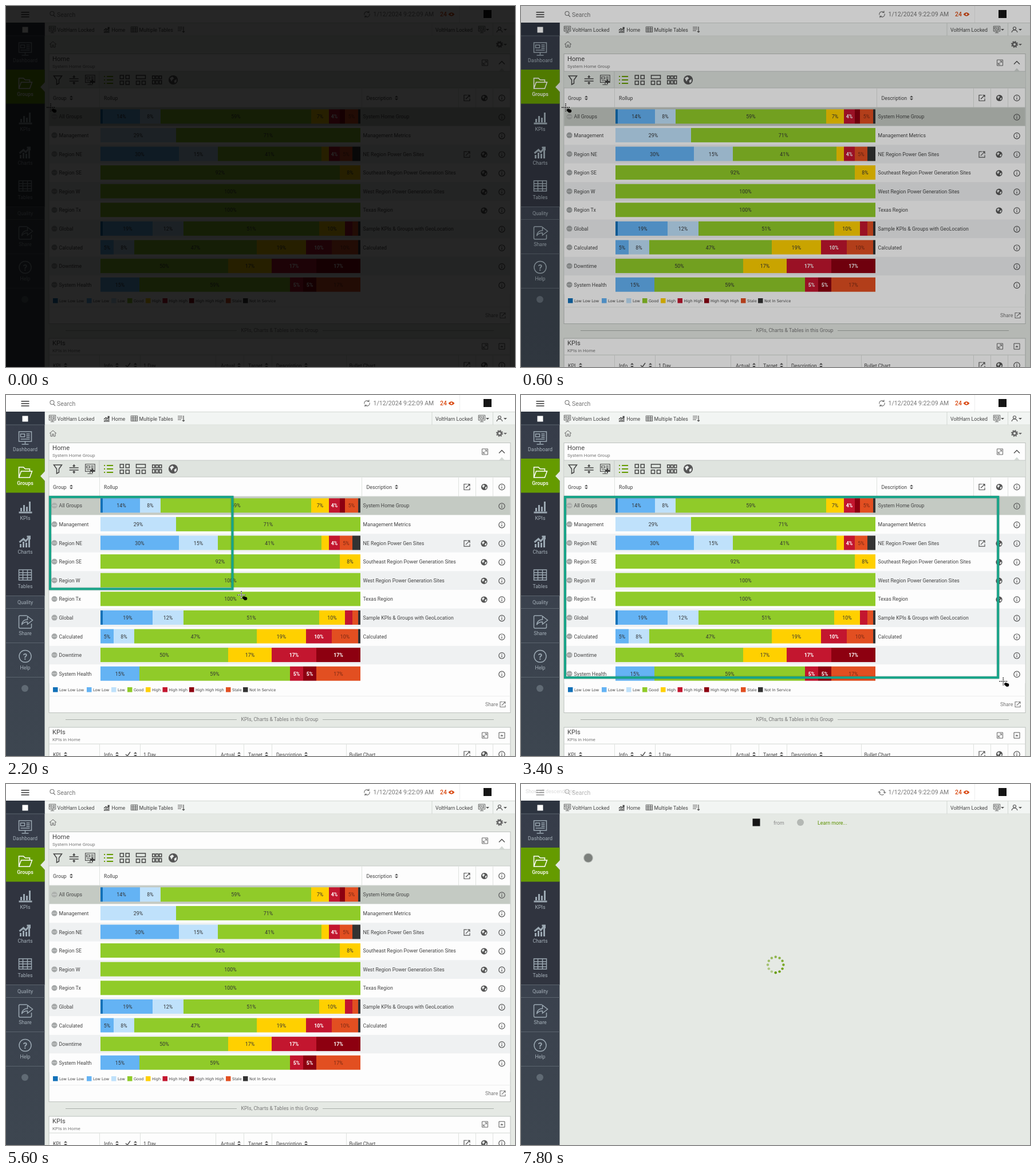
Recreate the animation shown at these times as an HTML page. Size 889 by 630 pixels, loop 8 s.

```html
<!DOCTYPE html>
<html lang="en">
<head>
<meta charset="utf-8">
<title>Dashboard walkthrough</title>
<style>
html, body { margin: 0; width: 100%; height: 100%; overflow: hidden; background: #e5e9e4; }
svg { display: block; width: 100vw; height: 100vh; }
text { font-family: Roboto, sans-serif; white-space: pre; }
.legend { font-family: "DejaVu Sans", sans-serif; }
</style>
</head>
<body>
<svg id="stage" viewBox="0 0 889 630"></svg>
<script>
const rect = (x, y, w, h, fill, extra = '') =>
  `<rect x="${x}" y="${y}" width="${w}" height="${h}" fill="${fill}" ${extra}/>`;
const line = (x1, y1, x2, y2, color = '#d3d7d3') =>
  `<path d="M${x1} ${y1}L${x2} ${y2}" stroke="${color}"/>`;
const text = (x, y, s, size = 8.8, fill = '#444', extra = '') =>
  `<text x="${x}" y="${y}" font-size="${size}" fill="${fill}" ${extra}>${s}</text>`;
const mid = 'text-anchor="middle"';
const dot = (x, y, r, fill) => `<circle cx="${x}" cy="${y}" r="${r}" fill="${fill}"/>`;

// Icon outlines centred on 0,0; "fill" entries are painted solid.
const icons = {
  monitor: { d: 'M-11-11H11V6H-11ZM0 6V10M-6 11H6M-8-7H-1V-2H-8ZM2-7H8M2-4H8M2-1H8M-8 2H8' },
  folder: { d: 'M-11 9V-9H-3L0-6H8V-2M-11 9L-7-2H12L8 9Z' },
  bars: { d: 'M-11 10H12M-7 8V2M-2 8V-3M3 8V0M8 8V-9', w: 3 },
  trend: { d: 'M-8 10V4M-3 10V0M2 10V2M7 10V-4M-10 1L-3-5L1-1L8-9M3-9H8V-4', w: 3 },
  table: { d: 'M-11-9H11V9H-11ZM-11-4H11M-11 0H11M-11 5H11M-4-9V9M4-9V9' },
  share: { d: 'M3-11H-9Q-11-11-11-9V9Q-11 11-9 11H9Q11 11 11 9V3M-6 5Q-5-4 4-4V-10L13-3L4 4V0Q-3 0-6 5Z' },
  funnel: { d: 'M-7-7H7L2 0V6L-2 8V0Z' },
  split: { d: 'M-8-2H8M-8 2H8M0-8V-4M0 4V8M-2-6L0-4L2-6M-2 6L0 4L2 6' },
  list: { d: 'M-8-6H-6M-8 0H-6M-8 6H-6M-3-6H8M-3 0H8M-3 6H8', w: 2 },
  grid: { d: 'M-8-8H-2V-2H-8ZM2-8H8V-2H2ZM-8 2H-2V8H-8ZM2 2H8V8H2Z' },
  rows: { d: 'M-8-8H8V-2H-8ZM-8 2H-2V8H-8ZM2 2H8V8H2Z' },
  columns: { d: 'M-8-7H-4V-2H-8ZM-2-7H2V-2H-2ZM4-7H8V-2H4ZM-8 1H-4V7H-8ZM-2 1H2V7H-2ZM4 1H8V7H4Z' },
  home: { d: 'M-6 0L0-5L6 0M-4-1V5H-1V1H1V5H4V-1', w: 1 },
  external: { d: 'M0-5H-5V5H5V1M-2 2L5-5M1-5H5V-1', w: 1.2 },
  expand: { d: 'M-5-5H5V5H-5ZM-3 3L3-3M0-3H3V0M-3 0V3H0', w: 1 },
  collapse: { d: 'M-5-5H5V5H-5ZM-2 1L0-1L2 1Z', w: 1 },
  chevron: { d: 'M-5 2L0-3L5 2' },
  sort: { d: 'M-3-1L0-4L3-1ZM-3 1L0 4L3 1Z', fill: 1 },
  caret: { d: 'M-3-1H3L0 2Z', fill: 1 },
  sortList: { d: 'M-6-4H2M-6-1H2M-6 2H0M4-5V5M2 3L4 5L6 3', w: 1.2 },
  user: { d: 'M-2.5-2A2.5 2.5 0 1 0 2.5-2A2.5 2.5 0 1 0-2.5-2M-5 5Q-4 1 0 1Q4 1 5 5', w: 1.2 },
  info: { d: 'M-5.2 0A5.2 5.2 0 1 0 5.2 0A5.2 5.2 0 1 0-5.2 0M0-3V-1.6M0-.5V3', w: 1.2 },
  help: { d: 'M-10.5 0A10.5 10.5 0 1 0 10.5 0A10.5 10.5 0 1 0-10.5 0' },
  refresh: { d: 'M-4.5 1A4.6 4.6 0 0 1 3-3.5M4.5-1A4.6 4.6 0 0 1-3 3.5M3.5-6V-3H.5M-3.5 6V3H-.5', w: 1.2 },
  search: { d: 'M-4-1A3.5 3.5 0 1 0 3-1A3.5 3.5 0 1 0-4-1M2 2L5 5', w: 1.1 },
  menu: { d: 'M-7-4H7M-7 0H7M-7 4H7', w: 1.7 },
  check: { d: 'M-4 0L-1 3L4-4' }
};
const icon = (name, x, y, color = '#555', scale = 1) => {
  const { d, w = 1.5, fill } = icons[name];
  const paint = fill ? `fill="${color}"` : `fill="none" stroke="${color}" stroke-width="${w}"`;
  return `<path d="${d}" transform="translate(${x} ${y}) scale(${scale})" ${paint}/>`;
};
const globe = (x, y, s = 1) => `<g transform="translate(${x} ${y}) scale(${s})">${dot(0, 0, 5.6, '#555')}
  <path d="M-4-2L-1-4L1-2L-1 0L-2 2ZM1 1L4-1L4 2L2 4Z" fill="#e9eceb"/></g>`;
const gear = (x, y) => `<circle cx="${x}" cy="${y}" r="3.4" fill="none" stroke="#666" stroke-width="2.6"/>
  <circle cx="${x}" cy="${y}" r="5.2" fill="none" stroke="#666" stroke-width="1.8" stroke-dasharray="2 2.08"/>`;

function header() {
  return rect(0, 0, 889, 29, '#fff') + rect(67, 29, 822, 23, '#f2f5f3') +
    line(0, 29.5, 889, 29.5) + line(67, 52, 889, 52, '#dde1dd') + line(792.5, 0, 792.5, 29, '#eee') +
    icon('menu', 33.5, 15, '#333') + icon('search', 81, 14, '#777') + text(89, 18.5, 'Search', 10.5, '#777') +
    `<g id="refresh">${icon('refresh', 0, 0, '#777')}</g>` +
    text(641.5, 18.3, '1/12/2024 9:22:09 AM', 10.5, '#777') +
    text(758, 18.3, '24', 10.5, '#d9480f', 'font-weight="500"') +
    '<path d="M772.5 14.5Q778 8 783.5 14.5Q778 21 772.5 14.5Z" fill="#d9480f"/>' + dot(778, 14.5, 1.6, '#fff') +
    rect(834, 7, 14, 14, '#151515') +
    icon('monitor', 81, 41, '#444', .52) + text(89.5, 44.5, 'VoltHarn Locked') +
    icon('trend', 176, 42, '#444', .5) + text(184.5, 44.5, 'Home') +
    icon('table', 224, 41, '#444', .52) + text(232.5, 44.5, 'Multiple Tables') +
    icon('sortList', 306, 41) + line(744, 30, 744, 52) + line(850.5, 30, 850.5, 52) +
    text(750, 44.5, 'VoltHarn Locked') + icon('monitor', 831, 41, '#444', .52) + icon('caret', 841, 41) +
    icon('user', 862, 41) + icon('caret', 872, 41);
}

function sidebar() {
  const items = [['monitor', 'Dashboard', 75, 97.5], ['folder', 'Groups', 135, 157], ['bars', 'KPIs', 195, 217.5],
    ['trend', 'Charts', 256, 277], ['table', 'Tables', 314, 336.5], ['share', 'Share', 396, 418.5], ['help', 'Help', 456, 478.5]];
  return rect(0, 29, 67.5, 601, 'url(#side)') + rect(0, 29, 67.5, 23, '#2d3440') +
    rect(0, 170, 67.5, 180, '#30343f') + rect(0, 111, 67.5, 59.5, '#659b00') +
    '<path d="M68 133L60 141.500L68 150Z" fill="#e5e9e4"/>' +
    [52, 350.5, 372.5, 432.5, 492.5].map(y => line(0, y, 67.5, y, '#5b646e')).join('') +
    items.map(([name, label, iconY, textY]) => {
      const active = label === 'Groups';
      return icon(name, 33.5, iconY, active ? '#fff' : '#9ba8b2') +
        text(33.5, textY, label, 8.9, active ? '#fff' : '#a4afb8', mid + (active ? ' font-weight="500"' : ''));
    }).join('') +
    text(33.5, 461.5, '?', 15, '#9ba8b2', mid + ' font-weight="700"') +
    text(33.5, 364.5, 'Quality', 8.9, '#a4afb8', mid) +
    rect(28.5, 36.5, 10, 10, '#fff') + dot(33, 512, 6, '#606a74');
}

const colors = { D: '#1271b8', B: '#64b3f4', L: '#bfe1fb', G: '#90cb29', Y: '#ffd000',
  R: '#c3162f', M: '#8d0010', O: '#e24f21', N: '#333' };

// Each bar part: colour key, right edge, optional percentage.
const groups = [
  ['All Groups', 'System Home Group', 'D169 B234:14 L270:8 G533:59 Y564:7 R583:4 M592 O615:5 N619'],
  ['Management', 'Management Metrics', 'L297:29 G619:71'],
  ['Region NE', 'NE Region Power Gen Sites', 'B302:30 L370:15 G551:41 Y564 R583:4 O605:5 N619'],
  ['Region SE', 'Southeast Region Power Generation Sites', 'G583:92 Y619:8'],
  ['Region W', 'West Region Power Generation Sites', 'G619:100'],
  ['Region Tx', 'Texas Region', 'G619:100'],
  ['Global', 'Sample KPIs &amp; Groups with GeoLocation', 'D169 B256:19 L310:12 G547:51 Y592:10 R605 O615 N619'],
  ['Calculated', 'Calculated', 'B188:5 L224:8 G438:47 Y524:19 R569:10 O615:10 N619'],
  ['Downtime', '', 'G388:50 Y464:17 R542:17 M619:17'],
  ['System Health', '', 'B233:15 G496:59 R519:5 M542:5 O619:17']
];

function bar(parts, y) {
  let left = 165;
  return parts.split(' ').map(part => {
    const key = part[0], [right, percent] = part.slice(1).split(':').map(Number);
    const strong = 'RM'.includes(key);
    const out = rect(left, y - 12.7, right - left, 25, colors[key]) + (percent ? text((left + right) / 2, y + 3.3,
      percent + '%', 8.8, strong ? '#fff' : key === 'O' ? '#7a2a14' : '#333', mid + (strong ? ' font-weight="700"' : '')) : '');
    left = right;
    return out;
  }).join('');
}

function groupRow([name, description, parts], i) {
  const y = 193 + 32.6 * i;
  const back = i === 0 ? '#c4cac3' : i % 2 ? '#fdfdfd' : '#eff1f2';
  return rect(75.5, y - 16, 805, 32.6, back) + dot(84.5, y, 5, i ? '#a5a8a8' : '#adb1ad') +
    [82, 84.5, 87].map(x => dot(x, y, .8, '#e8e8e8')).join('') +
    text(92.5, y + 3.4, name) + bar(parts, y) + text(623.5, y + 3.4, description) +
    (i === 2 ? icon('external', 805, y + 1) : '') + (i > 1 && i < 6 ? globe(835, y + 1) : '') +
    icon('info', 866, y + 1);
}

function legend() {
  const items = [['D', 82, 'Low Low Low'], ['B', 141, 'Low Low'], ['L', 184, 'Low'], ['G', 212, 'Good'], ['Y', 244, 'High'],
    ['R', 273.5, 'High High'], ['M', 320, 'High High High'], ['O', 384, 'Stale'], ['N', 414, 'Not In Service']];
  return items.map(([key, x, label]) => rect(x, 510, 8.5, 8.5, colors[key]) +
    text(x + 11, 517.3, label, 6.6, '#444', 'class="legend"')).join('');
}

const headIcons = y => icon('external', 805, y) + globe(835.5, y) + icon('info', 866, y);
const columns = (xs, top, bottom) => xs.map(x => line(x, top, x, bottom, '#dfe2df')).join('');

function content() {
  const tools = ['funnel', 'split', 'monitor', 'list', 'grid', 'rows', 'columns'];
  return icon('home', 82, 67, '#666') + gear(862, 67) + icon('caret', 872, 67, '#666') +
    rect(75, 83.5, 806, 471, '#fdfdfd', 'stroke="#bcc1bd"') +
    text(81, 96.3, 'Home', 11.2) + text(81, 107.6, 'System Home Group', 8.1, '#777') +
    icon('expand', 836.5, 99, '#666') + icon('chevron', 866, 99.5) +
    rect(75.5, 114, 805, 29, '#dfe4df') + line(75, 114, 881, 114, '#c4c9c5') + line(75, 143, 881, 143, '#c4c9c5') +
    '<path d="M861 114L866 108.500L871 114Z" fill="#d3d8d4"/>' + line(163, 114, 163, 143, '#c4c9c5') +
    tools.map((name, i) => icon(name, 90.5 + 28.2 * i + (i > 2 ? 4 : 0), 129, i === 3 ? '#659b00' : '#444', i === 2 ? .75 : 1)).join('') +
    '<path d="M147 125V133M151 129H143" stroke="#444" stroke-width="2" transform="translate(4 3)"/>' + globe(292, 129, 1.45) +
    columns([163.5, 621.5, 790.5, 820.5, 850.5], 143, 177) +
    text(82, 163.7, 'Group') + icon('sort', 114, 160.5) + text(171, 163.7, 'Rollup') +
    text(629.5, 163.7, 'Description') + icon('sort', 682, 160.5) + headIcons(160.5) +
    groups.map(groupRow).join('') + line(75.5, 177, 881, 177) + legend() + line(75.5, 525.5, 881, 525.5, '#eceeec') +
    text(837, 543.3, 'Share', 8.8, '#777') + icon('external', 867.5, 540, '#777', .9) +
    line(104, 566.5, 403, 566.5, '#a9afaa') + line(553, 566.5, 852, 566.5, '#a9afaa') +
    text(478, 569.3, 'KPIs, Charts &amp; Tables in this Group', 8.8, '#777', mid) +
    rect(75, 580, 806, 60, '#fdfdfd', 'stroke="#bcc1bd"') +
    text(81, 592.3, 'KPIs', 11.2) + text(81, 603.5, 'KPIs in Home', 8.1, '#777') +
    icon('expand', 836.5, 594, '#666') + icon('collapse', 866, 594, '#555') + line(75, 609, 881, 609) +
    columns([163.5, 234.5, 366.5, 415.5, 464.5, 594.5, 790.5, 820.5, 850.5], 609, 630) +
    [[82, 'KPI'], [171, 'Info'], [240, '1 Day'], [375, 'Actual'], [423, 'Target'], [472, 'Description'], [599.5, 'Bullet Chart']]
      .map(([x, label]) => text(x, 630.7, label)).join('') +
    [104, 194, 226, 407, 455, 524].map(x => icon('sort', x, 627)).join('') + icon('check', 213, 627) + headIcons(627);
}

const spinnerDots = Array.from({ length: 12 }, (_, i) => {
  const a = (90 - 30 * i) * Math.PI / 180;
  return `<circle cx="${13.7 * Math.cos(a)}" cy="${13.7 * Math.sin(a)}" r="2.2" fill="#659b00" opacity="${1 - .055 * i}"/>`;
}).join('');

const loading = () => rect(404.5, 60.5, 13, 13, '#151515') + text(441, 71, 'from', 8.8, '#888') + dot(488, 67, 6, '#b4b8b4') +
  text(518, 71, 'Learn more...', 8.8, '#5c9200') +
  `<g id="spinner">${spinnerDots}</g>`;

const stage = document.getElementById('stage');
stage.innerHTML = `<defs><linearGradient id="side" x2="0" y2="1">
    <stop stop-color="#363c49"/><stop offset=".5" stop-color="#3a414d"/><stop offset="1" stop-color="#3d4650"/>
  </linearGradient></defs>
  ${rect(0, 0, 889, 630, '#e5e9e4')}
  <g id="content">${content()}</g><g id="loading">${loading()}</g>
  ${header()}${sidebar()}
  <g id="tooltip">${rect(0, 0, 132, 25, '#fff', 'opacity=".45"')}${text(8, 15.5, 'Show all descendants', 8.8, '#333', 'opacity=".18"')}</g>
  <g id="marker"><rect id="frame" x="77" y="178" fill="none" stroke="#17a488" stroke-width="4"
    style="filter:drop-shadow(0 0 1px #0005)"/>
    <g id="cross"><path d="M-7 0H7M0-7V7" stroke="#fff" stroke-width="2"/>
    <path d="M-7 0H7M0-7V7" stroke="#111" stroke-width="1.300" stroke-dasharray="2 1"/>
    <ellipse cx="4.500" cy="4.800" rx="2.700" ry="2.500"/><ellipse cx="7" cy="6.200" rx="3.200" ry="3"/></g></g>
  <g id="pointer"><circle r="8.500" fill="#b9bdb9"/><circle r="7.300" fill="#7c807c"/></g>
  <rect id="shade" width="889" height="630"/>`;

const part = Object.fromEntries([...stage.querySelectorAll('[id]')].map(el => [el.id, el]));
const clamp = v => Math.min(1, Math.max(0, v));
const smooth = v => v * v * (3 - 2 * v);
const move = (el, x, y, angle = 0) => el.setAttribute('transform', `translate(${x} ${y}) rotate(${angle})`);
const show = (el, visible) => el.setAttribute('display', visible ? 'inline' : 'none');

function dragPoint(t) {
  const p = smooth(clamp((t - 950) / 2820));
  return [78 + 802 * p, 177 + 332 * (p + .424 * p * (1 - p))];
}

function render(t) {
  const loaded = t < 7600;
  show(part.content, loaded);
  show(part.loading, !loaded);
  show(part.tooltip, !loaded);
  move(part.refresh, 630.5, 14.5, loaded ? 0 : 60);
  move(part.spinner, 444.7, 315.5, (t - 7800) * .36);

  part.shade.setAttribute('opacity', .85 * clamp(1 - t / 800));

  move(part.cross, ...dragPoint(t));
  const [x, y] = dragPoint(t - 30);
  part.frame.setAttribute('width', Math.max(0, x - 80));
  part.frame.setAttribute('height', Math.max(0, y - 183));
  show(part.frame, t >= 1000);
  part.marker.setAttribute('opacity', clamp((5600 - t) / 400));

  const p = smooth(clamp((t - 6200) / 1000));
  move(part.pointer, 84 + 33.5 * p, 104 + 25 * Math.sqrt(p) * (.4 + .6 * p));
  part.pointer.setAttribute('opacity', clamp((t - 6200) / 500));
}

const STEP = 200, LOOP = 8000;
function tick() {
  render(Math.floor(performance.now() % LOOP / STEP) * STEP);
  requestAnimationFrame(tick);
}
tick();
</script>
</body>
</html>
```
